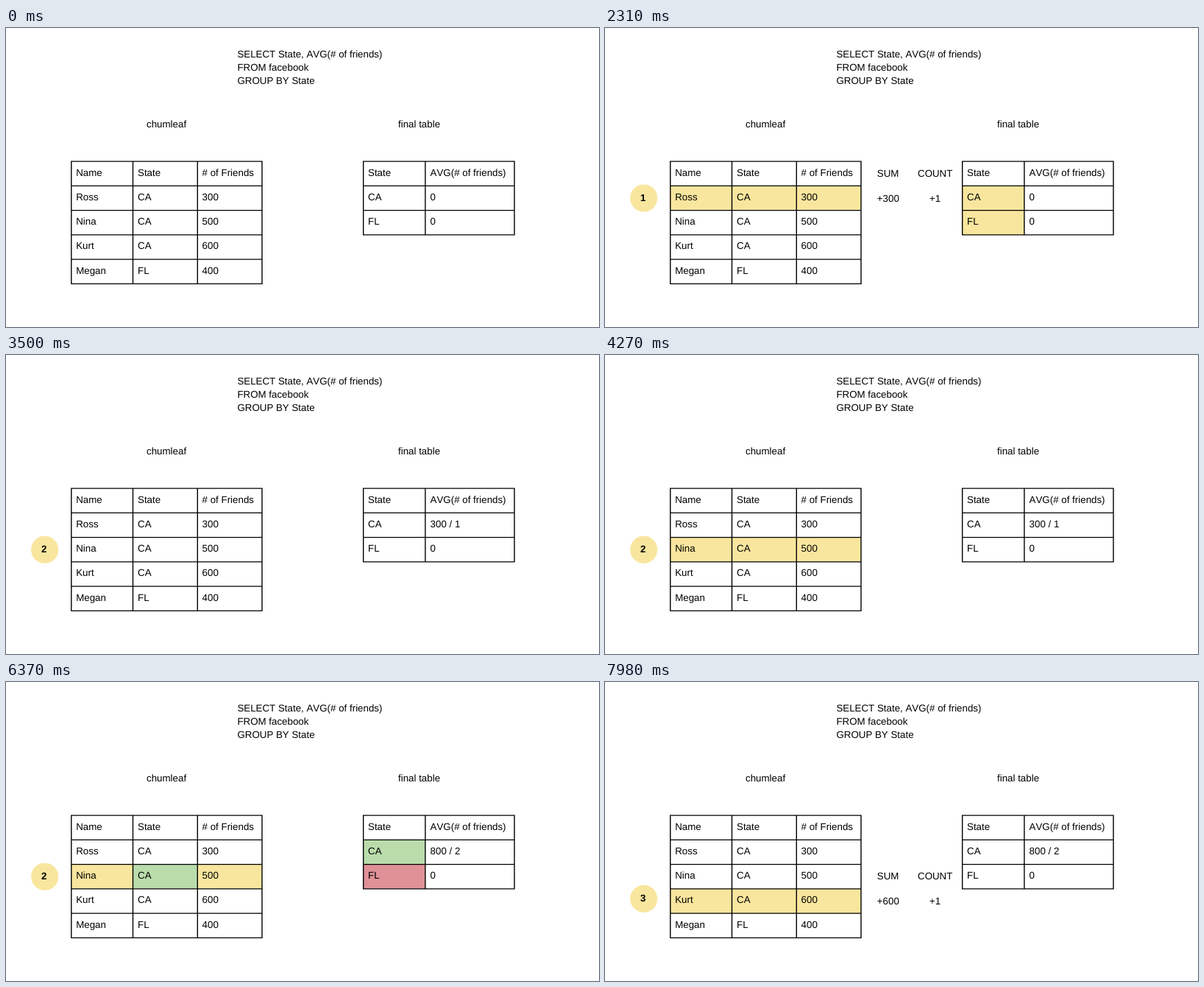
An HTML page for the animation above (8000 ms loop, 806 by 406 pixels).

```html
<!DOCTYPE html>
<html lang="en">
<head>
<meta charset="utf-8">
<title>GROUP BY with AVG</title>
<style>
  html, body { margin: 0; width: 100%; height: 100%; overflow: hidden; background: #fff; }
  svg { display: block; width: 100%; height: 100%; }
  text {
    font: 13.333px "Liberation Sans", Arial, sans-serif;
    font-kerning: none; text-rendering: geometricPrecision; white-space: pre;
  }
  .step { font-weight: bold; text-anchor: middle; }
  .grid { stroke: #000; stroke-width: 1.4; stroke-linecap: square; fill: none; }
</style>
</head>
<body>
<svg id="stage" viewBox="0 0 806 406"></svg>
<script>
const LOOP = 8000, TOP = 181.1, ROW = 33.25;
const YELLOW = "#f9e69e", GREEN = "#badcab", RED = "#e09197";
const stage = document.getElementById("stage");

const people = [["Ross", "CA", 300], ["Nina", "CA", 500], ["Kurt", "CA", 600], ["Megan", "FL", 400]];
const source = { edges: [88.8, 172.5, 260.3, 348], textX: [95.2, 179, 266.6], rows: [["Name", "State", "# of Friends"], ...people] };
const result = { edges: [485.7, 569.9, 691], textX: [492, 576.6], rows: [["State", "AVG(# of friends)"], ["CA", "0"], ["FL", "0"]] };

// Start times of each stage while one row is being processed.
const rounds = [
  { step: 350, row: 840, labels: 1120, compare: 1680, match: 2380, add: 2800 },
  { step: 3220, row: 3990, labels: 4410, compare: 4830, match: 5390, add: 5880 },
  { step: 6580, row: 7350, labels: 7770, compare: LOOP, match: LOOP, add: LOOP },
];
const circleY = [231, 264.3, 294.4];

function add(tag, attrs, content = "") {
  const node = document.createElementNS("http://www.w3.org/2000/svg", tag);
  for (const name in attrs) node.setAttribute(name, attrs[name]);
  node.textContent = content;
  return stage.appendChild(node);
}
const label = (x, y, content, cls = "") => add("text", { x, y, class: cls }, content);
const show = (node, visible) => node.setAttribute("visibility", visible ? "visible" : "hidden");

function buildTable({ edges, textX, rows }) {
  const bottom = TOP + rows.length * ROW;
  const cells = rows.map((row, r) => row.map((_, c) => add("rect", {
    x: edges[c], y: TOP + r * ROW, width: edges[c + 1] - edges[c], height: ROW, fill: "#fff",
  })));
  let d = edges.map(x => `M${x} ${TOP}V${bottom}`).join("");
  for (let r = 0; r <= rows.length; r++) d += `M${edges[0]} ${TOP + r * ROW}H${edges.at(-1)}`;
  add("path", { d, class: "grid" });
  const texts = rows.map((row, r) => row.map((value, c) => label(textX[c], TOP + 19.6 + r * ROW, value)));
  return { cells, texts };
}

["SELECT State, AVG(# of friends)", "FROM facebook", "GROUP BY State"]
  .forEach((line, i) => label(314.4, 40 + 18 * i, line));
label(191, 135, "chumleaf");
label(533, 135, "final table");
const left = buildTable(source), right = buildTable(result);

const circle = add("circle", { cx: 52.7, r: 18.6, fill: YELLOW });
const stepText = label(51.7, 0, "", "step");
const sumHead = label(369.8, 0, "SUM"), sumText = label(369.8, 0, "");
const countHead = label(425, 0, "COUNT"), countText = label(441, 0, "+1");
const labels = [sumHead, countHead, sumText, countText];

function draw(t) {
  const current = rounds.findLastIndex(round => t >= round.step);
  const round = rounds[current];
  const since = stage => Boolean(round) && t >= round[stage];

  show(circle, round);
  show(stepText, round);
  if (round) {
    circle.setAttribute("cy", circleY[current]);
    stepText.setAttribute("y", Math.round(circleY[current] + 3.8));
    stepText.textContent = current + 1;
    sumText.textContent = "+" + people[current][2];
    labels.forEach((node, i) => node.setAttribute("y", 202 + current * 33 + (i > 1 ? 34 : 0)));
  }
  labels.forEach(node => show(node, since("labels") && !since("add")));

  left.cells.forEach((row, r) => row.forEach((cell, c) => {
    const active = r === current + 1 && since("row");
    cell.setAttribute("fill", !active ? "#fff" : c === 1 && since("match") ? GREEN : YELLOW);
  }));
  [GREEN, RED].forEach((verdict, i) =>
    right.cells[i + 1][0].setAttribute("fill", since("match") ? verdict : since("compare") ? YELLOW : "#fff"));

  const count = rounds.filter(r => t >= r.add).length;
  const sum = people.slice(0, count).reduce((total, person) => total + person[2], 0);
  right.texts[1][1].textContent = count ? `${sum} / ${count}` : "0";
}

function frame() {
  draw(performance.now() % LOOP);
  requestAnimationFrame(frame);
}
frame();
</script>
</body>
</html>
```
